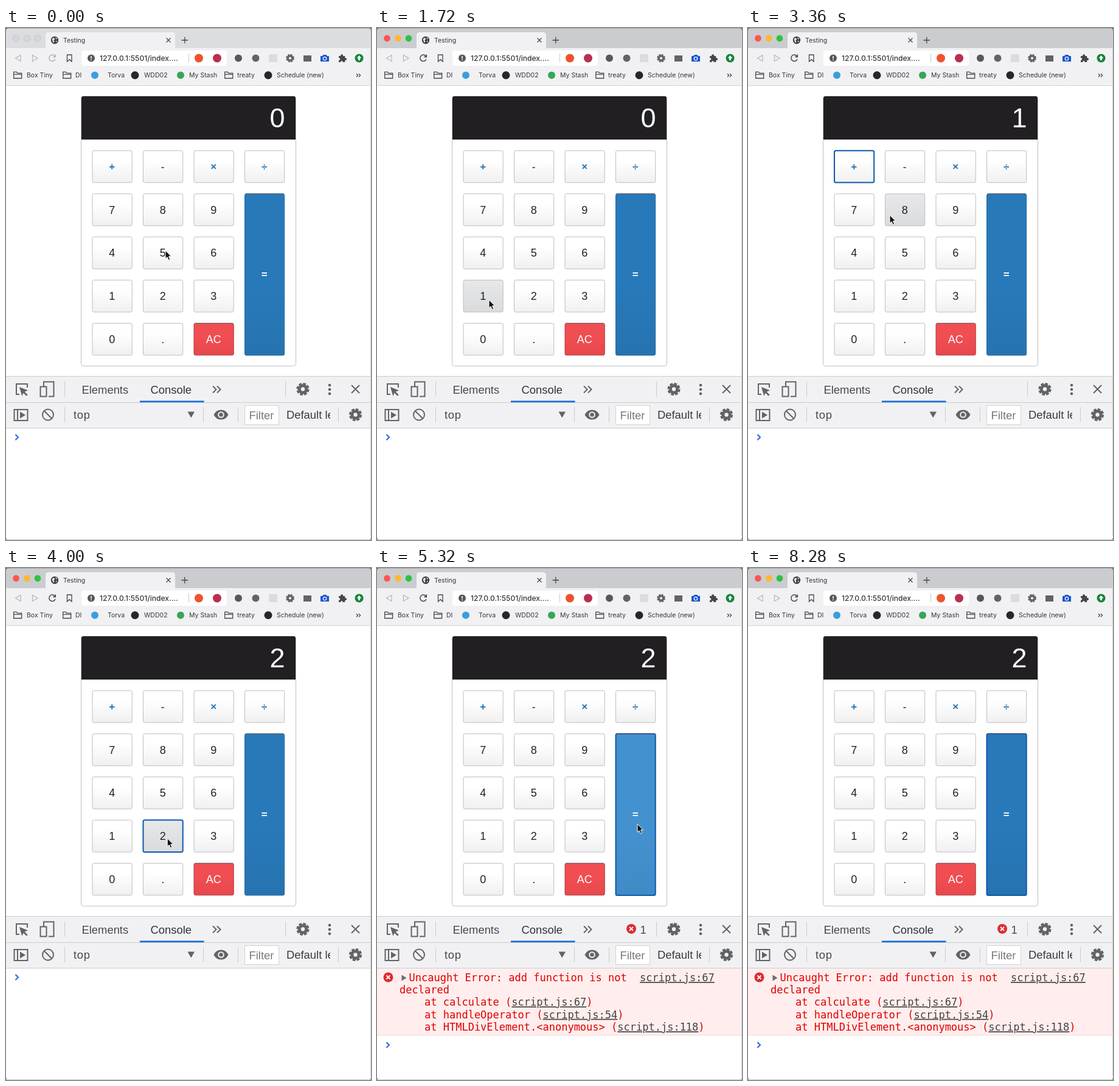
Animation, 600 px wide and 840 px high, one loop 8320 ms. Source, as an HTML page:

```html
<!DOCTYPE html>
<html lang="en">
<head>
<meta charset="utf-8">
<title>Calculator</title>
<style>
html, body { margin: 0; width: 100%; height: 100%; overflow: hidden; background: #fff; }
svg { display: block; }
text { font-family: "Liberation Sans", Arial, sans-serif; white-space: pre; }
.ui text { font-family: Inter, sans-serif; font-size: 10.5px; fill: #333639; }
.tools text { font-size: 18.4px; fill: #47494d; }
.mono text { font-family: "DejaVu Sans Mono", monospace; font-size: 17px; fill: #e00000; }
.mono .link { fill: #444; text-decoration: underline; }
.line { fill: none; stroke: #606367; stroke-width: 2; }
.thin { fill: none; stroke: #44474a; stroke-width: 1.3; }
</style>
</head>
<body>
<svg id="stage" width="600" height="840" viewBox="0 0 600 840">
  <defs>
    <linearGradient id="plain" x2="0" y2="1"><stop offset=".3" stop-color="#fff"/><stop offset="1" stop-color="#f1f0f1"/></linearGradient>
    <linearGradient id="hover" x2="0" y2="1"><stop stop-color="#e8e8ea"/><stop offset="1" stop-color="#d9dbdd"/></linearGradient>
    <linearGradient id="blue" x2="0" y2="1"><stop offset=".6" stop-color="#2879b9"/><stop offset="1" stop-color="#2673b0"/></linearGradient>
    <linearGradient id="blueHover" x2="0" y2="1"><stop offset=".6" stop-color="#4491cf"/><stop offset="1" stop-color="#408bc6"/></linearGradient>
    <linearGradient id="red" x2="0" y2="1"><stop offset=".4" stop-color="#f04e53"/><stop offset="1" stop-color="#e8474c"/></linearGradient>
    <linearGradient id="redHover" x2="0" y2="1"><stop stop-color="#f4757a"/><stop offset="1" stop-color="#ee676c"/></linearGradient>
    <clipPath id="level"><rect x="455" y="620" width="78" height="30"/></clipPath>
    <g id="gear">
      <circle r="8.6" fill="none" stroke="#606367" stroke-width="4" stroke-dasharray="4.6 2.15"/>
      <circle r="5.7" fill="none" stroke="#606367" stroke-width="5"/>
    </g>
    <path id="folder" class="thin" d="M.7 1.2h4.6l1.6 2h6.8v8.3H.7zM.7 5.2h13"/>
  </defs>

  <g class="ui">
    <rect id="strip" width="600" height="34"/>
    <path d="M0 .5H600" stroke="#a8a3a5"/>
    <rect y="33" width="600" height="61" fill="#f1f1f3"/>
    <path d="M0 94.5H600" stroke="#d5d5d7"/>
    <path d="M65 34V12q0-5 5-5H273q5 0 5 5V34z" fill="#f1f1f3"/>
    <g id="lights"></g>
    <circle cx="80" cy="20" r="6.2" fill="#3f4245"/>
    <path d="M75.5 18l3-2 2 2-2 2 1 3-2 1zM81 15l3 2-1 2zM82 21l2 0-2 3z" fill="#e9e9eb"/>
    <text x="94" y="24">Testing</text>
    <path class="thin" d="M263.5 16.5l7 7m0-7l-7 7M288.5 20h10.5m-5.2-5.2v10.5" stroke-width="1.6"/>
    <path d="M24 44.5v10l-8.5-5zM43.500 44.500v10l8.500-5z" fill="none" stroke="#b4b5b8" stroke-width="1.2"/>
    <g id="reload" fill="none" stroke-width="1.5"><path d="M80.500 46.500A5.200 5.200 0 1 0 81 51M81.300 43.500v4h-4"/></g>
    <path class="thin" d="M100.500 44h7.500v11l-3.750-3.300-3.750 3.300z"/>
    <rect x="124" y="37" width="239" height="25" rx="4" fill="#fff"/>
    <circle cx="140" cy="49.500" r="6" fill="#55585b"/>
    <path d="M140 46v4.200m0 1.300v1.700" stroke="#fff" stroke-width="1.600"/>
    <text x="154" y="53.500" style="font-size:12.100px;font-weight:500">127.0.0.1:5501/index....</text>
    <path d="M300.500 42v14" stroke="#c8c8ca"/>
    <circle cx="317" cy="49.500" r="7" fill="#f0522b"/>
    <circle cx="347" cy="49.500" r="7" fill="#b82f52"/>
    <circle cx="382" cy="49.500" r="6" fill="#55585b"/>
    <circle cx="410.500" cy="49.500" r="6" fill="#606367"/>
    <rect x="432" y="43" width="14" height="13" fill="#dcdcde"/>
    <use href="#gear" transform="translate(467 49.500) scale(.65)"/>
    <rect x="489" y="45" width="13" height="10" fill="#606367"/>
    <path d="M517 46h3l1.500-2h5l1.500 2h3v9h-14z" fill="#1c55cf"/>
    <circle cx="524" cy="50.300" r="2.700" fill="none" stroke="#fff" stroke-width="1.200"/>
    <path d="M547 46h3.300a2 2 0 1 1 3.600 0h3.300v3.300a2 2 0 1 1 0 3.600V56h-3.600a1.700 1.700 0 1 0-3.300 0H547v-3.300a1.800 1.800 0 1 0 0-3.500z" fill="#44474a"/>
    <circle cx="580.500" cy="49.500" r="7" fill="#128536"/>
    <path d="M580.500 45l4 4.500h-2.500v3.500h-3v-3.500h-2.500z" fill="#fff"/>
    <use href="#folder" x="12" y="71"/><use href="#folder" x="93" y="71"/><use href="#folder" x="359" y="71"/>
    <circle cx="146" cy="77.500" r="6" fill="#3b9de0"/>
    <circle cx="212" cy="77.500" r="6.500" fill="#24272b"/>
    <circle cx="287" cy="77.500" r="6" fill="#35a65a"/>
    <circle cx="431" cy="77.500" r="6.500" fill="#24272b"/>
    <g id="marks"></g>
    <path class="thin" d="M576 75l2.500 2.700-2.500 2.700m4-5.400l2.500 2.700-2.500 2.700"/>
  </g>

  <rect x="123.500" y="112" width="353" height="442.700" rx="4" fill="#fff" stroke="#c0bfc4"/>
  <path d="M124 183V115q0-3 3-3H473q3 0 3 3V183z" fill="#211f22"/>
  <text id="display" x="458.500" y="163" font-size="45" fill="#fff" text-anchor="end"></text>
  <g id="keys" text-anchor="middle"></g>

  <g class="tools">
    <rect y="572" width="600" height="84" fill="#f1f1f3"/>
    <path d="M0 571.500H600M0 614.500H600M0 656.500H600" stroke="#cbcbce"/>
    <path d="M96.500 580v25M459.500 580v25M96.500 622v25M324.500 622v25M381.500 622v25M546.500 622v25" stroke="#cbcbce"/>
    <path class="line" d="M22 601h-5v-17h18v6"/>
    <path d="M22 589l14 5.500-5.300 2.300 5 5-2 2-5-5-2.400 5z" fill="#606367"/>
    <path class="line" d="M62 588v-7.500h16.500v24H70M56.500 588.500h10v16h-10z"/>
    <text x="124.500" y="599.500">Elements</text>
    <text x="237.500" y="599.500" style="fill:#303236">Console</text>
    <rect x="220" y="611.500" width="105.500" height="2.700" fill="#1a70d8"/>
    <path class="line" d="M340 587.500l5.500 5.500-5.500 5.500m7-11l5.500 5.500-5.500 5.500"/>
    <use href="#gear" x="488" y="592.500"/><use href="#gear" x="574.500" y="634.500"/>
    <g fill="#606367"><circle cx="532" cy="586" r="2.300"/><circle cx="532" cy="593" r="2.300"/><circle cx="532" cy="600" r="2.300"/></g>
    <path class="line" d="M568 586l13 13m0-13l-13 13" stroke-width="2.200"/>
    <path class="line" d="M13.500 626h22v18h-22zM19 626v18"/><path d="M23 629.500v11l9-5.500z" fill="#606367"/>
    <circle class="line" cx="69" cy="634.500" r="9"/><path class="line" d="M62.800 628.300l12.500 12.500"/>
    <text x="111" y="641" letter-spacing=".7">top</text>
    <path d="M298.500 629.500h11.500l-5.750 10z" fill="#606367"/>
    <path d="M341.500 634.500q4-8 12-8t12 8q-4 8-12 8t-12-8z" fill="#606367"/>
    <circle cx="353.500" cy="634.500" r="4.300" fill="#606367" stroke="#f1f1f3" stroke-width="2"/>
    <rect x="392.500" y="619.500" width="56" height="31" fill="#fff" stroke="#d3d3d6"/>
    <text x="399.500" y="641.500" style="fill:#76787b">Filter</text>
    <text x="461" y="641" clip-path="url(#level)" style="fill:#38393c">Default levels</text>
  </g>

  <g id="error">
    <rect y="657" width="600" height="110" fill="#ffeeed"/>
    <path d="M0 766.500H600" stroke="#fbd5d5"/>
    <g class="tools"><text x="432.500" y="599.500">1</text></g>
    <g id="badges"></g>
    <path d="M40.500 667.500v10l8-5z" fill="#6d6d70"/>
    <g class="mono" id="trace"></g>
  </g>
  <path id="prompt" d="M15.500 667l4.500 4.500-4.500 4.500" fill="none" stroke="#2f6fe0" stroke-width="2.200"/>
  <path d="M599.500 6V834" stroke="#d2d2d4"/>
  <path d="M0 0h5q-5 0-5 5zM600 0h-5q5 0 5 5zM0 840h5q-5 0-5-5zM600 840h-5q5 0 5-5z" fill="#6b6264"/>
  <path d="M0 839.500H600" stroke="#c9c9cb"/>
  <path id="cursor" d="M0 0V13.500L3 10.700 5.300 15.800 7.700 14.700 5.500 9.800H9.600z" fill="#111" stroke="#fff"/>
</svg>

<script>
const LOOP = 8320, ACTIVE = 1320, ERROR = 4800;
const $ = id => document.getElementById(id);
const text = (x, y, s, attrs = "") => `<text x="${x}" y="${y}" ${attrs}>${s}</text>`;

// Bookmarks and window lights
const marks = [[34, "Box Tiny"], [114, "DI"], [167, "Torva"], [227, "WDD02"],
  [301, "My Stash"], [380, "treaty"], [445, "Schedule (new)"]];
$("marks").innerHTML = marks.map(([x, s]) => text(x, 81.3, s)).join("");
$("lights").innerHTML = [16.5, 34.5, 52].map(x => `<circle cx="${x}" cy="17" r="5.4"/>`).join("");
const lights = [...$("lights").children];

// Error message
$("badges").innerHTML = [[418, 592], [18.5, 671.5]].map(([x, y]) =>
  `<circle cx="${x}" cy="${y}" r="8" fill="#dc2d2f"/>
   <path d="M${x - 3} ${y - 3}l6 6m0-6l-6 6" stroke="#fff" stroke-width="1.8"/>`).join("");
const link = s => `<tspan class="link">${s}</tspan>`;
$("trace").innerHTML =
  text(52.5, 678, "Uncaught Error: add function is not") +
  text(432, 678, link("script.js:67")) +
  text(37, 698, "declared") +
  [["calculate", 67], ["handleOperator", 54], ["HTMLDivElement.&lt;anonymous&gt;", 118]]
    .map(([fn, n], i) => text(78, 718.3 + i * 20.4, `at ${fn} (${link("script.js:" + n)})`)).join("");

// Calculator keys
const keys = [..."+-×÷789=456 123 0.A"].map((c, i) => ({
  c, x: 142 + (i % 4) * 83.5, y: 201.2 + (i >> 2) * 70.8, w: 65.2, h: c === "=" ? 265 : 52.4
})).filter(k => k.c !== " ");

for (const k of keys) {
  k.skin = k.c === "=" ? "blue" : k.c === "A" ? "red" : "plain";
  k.edge = { blue: "#2469a2", red: "#a63c40", plain: "#bdbcc2" }[k.skin];
  const bold = "+-×÷=".includes(k.c);
  const color = k.skin !== "plain" ? "#fff" : bold ? "#2473b2" : "#222124";
  const g = document.createElementNS("http://www.w3.org/2000/svg", "g");
  g.innerHTML = `<rect x="${k.x}" y="${k.y}" width="${k.w}" height="${k.h}" rx="2.5"/>` +
    text(k.x + k.w / 2 - .4, k.y + k.h / 2 + (bold ? 5.2 : 6.4), k.c === "A" ? "AC" : k.c,
      `fill="${color}" font-size="${bold ? 17 : 18}" ${bold ? 'font-weight="bold"' : ""}`);
  if (k.skin !== "plain") g.innerHTML += `<path d="M${k.x + 1} ${k.y}h${k.w - 2}" stroke="#6b5d62"/>`;
  k.rect = g.firstChild;
  $("keys").append(g);
}

// Pointer stops: time, x, y
const stops = [[0, 262, 365], [360, 262, 365], [1080, 184, 446], [2160, 184, 446], [2720, 179, 231],
  [3040, 179, 231], [3360, 233, 307], [3680, 262, 444], [3960, 262, 444], [4440, 419, 421],
  [4680, 428, 420], [5560, 428, 420], [6080, 620, 470]];
const clicks = [[2000, "1"], [2920, "+"], [3840, "2"], [ERROR, "="]];

function pointer(t) {
  const i = stops.findIndex(s => s[0] > t);
  if (i < 0) return stops.at(-1).slice(1);
  const [t0, x0, y0] = stops[i - 1], [t1, x1, y1] = stops[i];
  const p = (t - t0) / (t1 - t0), e = p * p * (3 - 2 * p);
  return [x0 + (x1 - x0) * e, y0 + (y1 - y0) * e];
}

function draw(now) {
  const t = now % LOOP, active = t >= ACTIVE, failed = t >= ERROR;
  const [x, y] = pointer(t);
  const done = clicks.filter(c => c[0] <= t).map(c => c[1]);
  const focus = done.at(-1);

  $("cursor").setAttribute("transform", `translate(${x} ${y})`);
  $("display").textContent = done.filter(c => c > "0" && c <= "9").at(-1) || "0";
  $("strip").setAttribute("fill", active ? "#cbccd0" : "#dcdde0");
  $("reload").setAttribute("stroke", active ? "#44474a" : "#b4b5b8");
  lights.forEach((l, i) => {
    l.setAttribute("fill", active ? ["#fc5650", "#fdb92e", "#2bc440"][i] : "#d5d6d9");
    l.setAttribute("stroke", active ? "none" : "#c6c7ca");
  });
  for (const k of keys) {
    const over = active && x >= k.x && x <= k.x + k.w && y >= k.y && y <= k.y + k.h;
    const fill = !over ? k.skin : k.skin === "plain" ? "hover" : k.skin + "Hover";
    k.rect.setAttribute("fill", `url(#${fill})`);
    k.rect.setAttribute("stroke", k.c === focus ? "#0d57ad" : k.edge);
    k.rect.setAttribute("stroke-width", k.c === focus ? 2 : 1);
  }
  $("error").style.display = failed ? "" : "none";
  $("prompt").setAttribute("transform", `translate(0 ${failed ? 111 : 0})`);
}

const start = performance.now();
function tick() {
  draw(performance.now() - start);
  requestAnimationFrame(tick);
}
tick();
</script>
</body>
</html>
```
